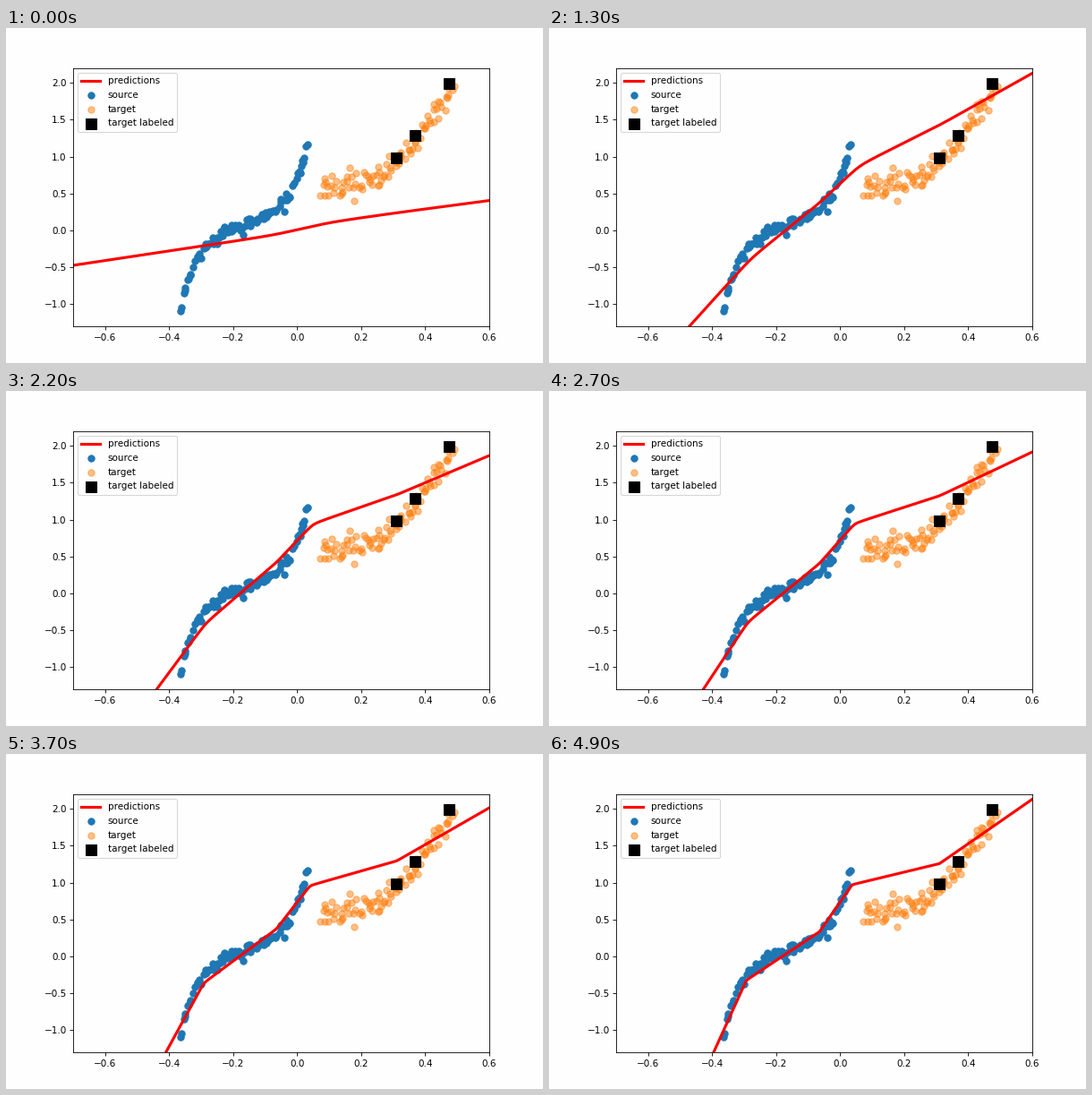
Write a matplotlib script that moves like this. It is 600x374 px and loops after 5000 ms.

```python
import numpy as np
import matplotlib.pyplot as plt
from matplotlib.animation import FuncAnimation

WIDTH, HEIGHT, DPI = 600, 374, 75
FRAMES, INTERVAL = 50, 100
XLIM, YLIM = (-0.7, 0.6), (-1.3, 2.2)

# Training stages in seconds, and the curve's height at its ends and bends.
STAGES = [0, 0.6, 1.3, 2.2, 4.9]
HEIGHTS = np.array([
    [-0.475, -0.186, -0.062, 0.109, 0.239, 0.405],
    [-1.990, -0.192, 0.376, 0.630, 1.056, 1.658],
    [-2.400, -0.372, 0.370, 0.890, 1.427, 2.132],
    [-2.833, -0.400, 0.418, 0.947, 1.336, 1.870],
    [-4.219, -0.325, 0.332, 0.973, 1.257, 2.132],
])
KNOTS = np.array([XLIM[0], -0.295, -0.065, 0.035, 0.31, XLIM[1]])
KNOT_DRIFT = np.array([0, 0.04, 0, 0.06, 0, 0])


def source_cloud(rng, count=92):
    """Steep at both ends, gentle in the middle."""
    u = np.clip(np.linspace(-1, 1, count) + rng.normal(0, 0.015, count), -1, 1)
    y = 0.07 + 0.4 * u + 0.77 * u ** 5 + rng.normal(0, 0.045, count)
    return -0.165 + 0.2 * u, y


def target_cloud(rng, count=90):
    """Flat at first, then rising ever faster."""
    u = np.clip(np.linspace(0, 1, count) + rng.normal(0, 0.01, count), 0, 1)
    y = 0.56 + 1.45 * u ** 2.4 + rng.normal(0, 0.095, count)
    return 0.072 + 0.418 * u, y


def prediction(time):
    """Chain of straight pieces whose bends sharpen as training goes on."""
    early = np.exp(-time / 1.5)
    knots = KNOTS + KNOT_DRIFT * early
    heights = [np.interp(time, STAGES, column) for column in HEIGHTS.T]
    slopes = np.diff(heights) / np.diff(knots)
    x = np.linspace(*XLIM, 500)
    y = heights[0] + slopes[0] * (x - knots[0])
    for knot, bend in zip(knots[1:-1], np.diff(slopes)):
        d = x - knot
        y += bend * (d + np.hypot(d, 0.06 * early)) / 2
    return x, y


rng = np.random.default_rng(4)
fig, ax = plt.subplots(figsize=(WIDTH / DPI, (HEIGHT + 0.001) / DPI), dpi=DPI)
fig.set_facecolor("#fefefe")
ax.set_facecolor("#fefefe")
line, = ax.plot(*prediction(0), color="red", lw=3, label="predictions")
ax.scatter(*source_cloud(rng), s=50, label="source")
ax.scatter(*target_cloud(rng), s=50, alpha=0.5, label="target")
ax.scatter([0.309, 0.369, 0.474], [0.98, 1.285, 1.99], s=115, c="black",
           marker="s", label="target labeled")
ax.set_xlim(XLIM)
ax.set_ylim(YLIM)
ax.tick_params(axis="x", pad=4.2)
ax.legend(loc="upper left", labelspacing=0.55)


def update(frame):
    line.set_data(*prediction(frame * INTERVAL / 1000))
    return line,


animation = FuncAnimation(fig, update, frames=FRAMES, interval=INTERVAL,
                          repeat=True, repeat_delay=0)
plt.show()
```
